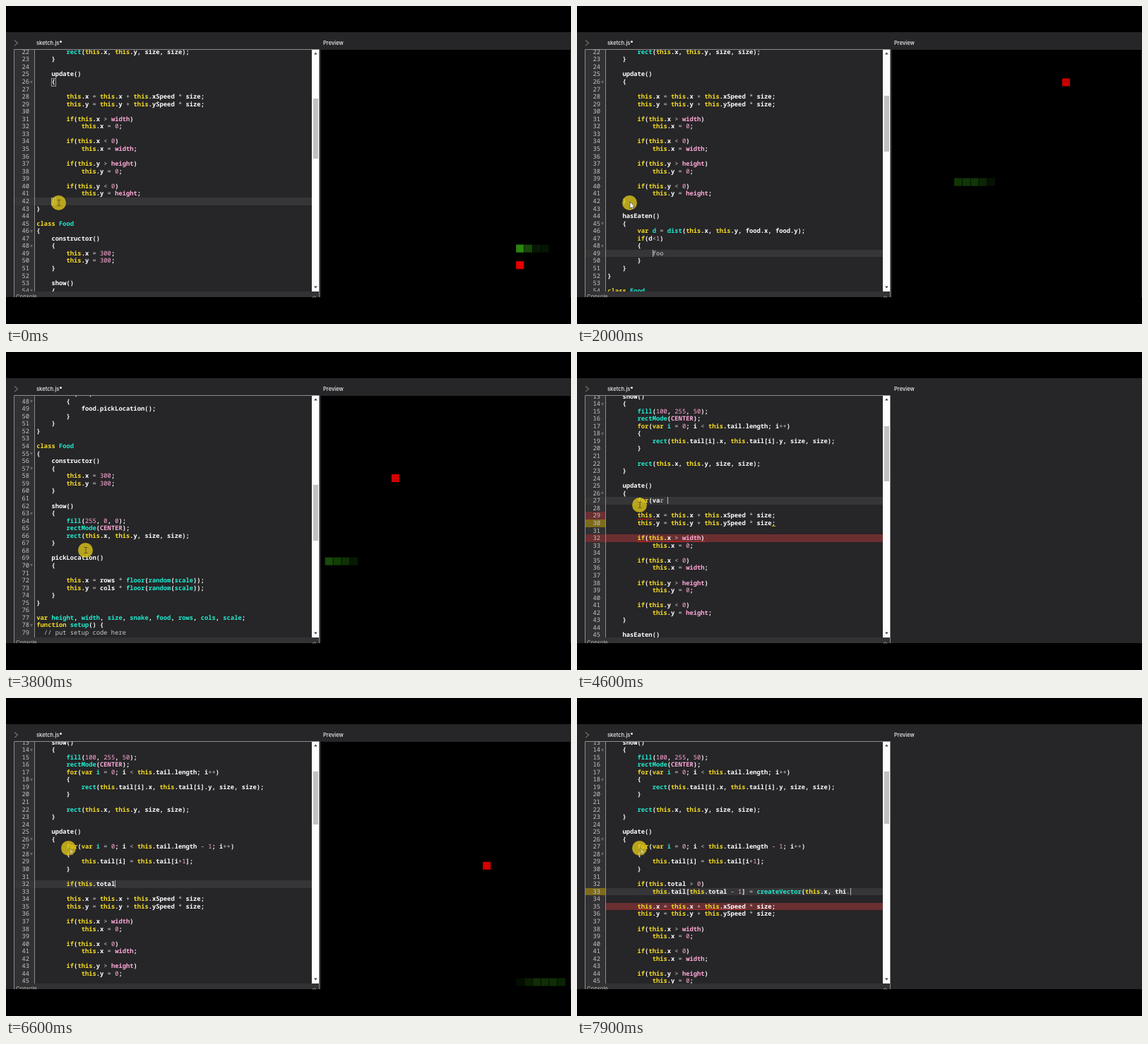
Write an HTML page with a canvas that moves like this. It is 800 by 450 pixels and loops after 8 s.

```html
<!DOCTYPE html>
<html lang="en">
<head>
<meta charset="utf-8">
<title>Snake sketch in a code editor</title>
<style>
  html, body { margin: 0; width: 100%; height: 100%; overflow: hidden; background: #000; }
  #stage { position: relative; width: 800px; height: 450px; overflow: hidden; background: #000; }
  #stage div, #stage span.abs, svg, canvas { position: absolute; }
  #app { left: 0; top: 37px; width: 800px; height: 375px; background: #262527; overflow: hidden; }
  .label { font: 500 7.6px/10px Inter, sans-serif; color: #f0f0f0; white-space: pre; }
  #gutter { left: 12px; top: 62px; width: 28px; height: 342px; background: #313032; }
  #editor { left: 12px; top: 62px; width: 422px; height: 342px; overflow: hidden; }
  #code { left: 0; top: 0; width: 422px; height: 342px; }
  .line { left: 0; width: 422px; height: 10.56px; white-space: pre; color: #fff;
    font: 600 8.8px/10.56px "Noto Sans Mono", monospace; text-rendering: geometricPrecision;
    font-variant-ligatures: none; }
  .num { left: 0; width: 21px; text-align: right; color: #c4c4c4; font-weight: 500; }
  .gut { left: 0; width: 28px; height: 10.56px; }
  .fold { left: 21.5px; top: 3.5px; border: solid transparent; border-width: 4px 2.5px 0; border-top-color: #666; }
  .src { left: 31.3px; }
  .line i { font-style: normal; opacity: .5; }
  .kw { color: #f5dc23; }
  .fn, .def { color: #1fecd0; font-weight: 700; }
  .var { color: #ffa9d9; font-weight: 700; }
  .n { color: #ffa9d9; font-weight: 500; }
  .op { color: #d0d0d0; font-weight: 500; }
  .com { color: #c8c8c8; font-weight: 500; }
  .on { background: #363537; }
  .err { background: #6b2f31; }
  .warn { background: #7d6b1c; }
  .wave { height: 1px; top: 9.4px; }
  .caret { width: 1px; height: 10px; background: #bbb; }
  .match { left: 52px; width: 5px; height: 9.5px; border: 1px solid #999; box-sizing: content-box; }
  #bar { left: 433px; top: 62px; width: 10px; height: 342px; background: #fcfcfc; }
  #thumb { left: 2px; width: 7px; background: #c1c1c1; }
  #spot { width: 21px; height: 21px; border-radius: 50%; background: #dcc41a; opacity: .8; }
  #beam { opacity: .6; }
</style>
</head>
<body>
<div id="stage">
  <div id="app"></div>
  <div class="label" style="left:43px;top:48px">sketch.js</div>
  <div style="left:76px;top:49px;width:3.4px;height:3.4px;border-radius:50%;background:#eee"></div>
  <div class="label" style="left:449px;top:48px">Preview</div>
  <div id="gutter"></div>
  <div id="editor"><div id="code"></div></div>
  <canvas id="view" width="353" height="350" style="left:446px;top:62px"></canvas>
  <div id="bar"><div id="thumb"></div></div>
  <div style="left:12px;top:404px;width:432px;height:8px;background:#323133;overflow:hidden">
    <div class="label" style="left:2px;top:3px;color:#aaa">Console</div>
  </div>
  <svg width="800" height="450" fill="none">
    <path d="M12 48.5l4.5 3.8-4.5 3.8" stroke="#777" stroke-width="1.1"/>
    <path d="M11.5 412V61.5H443.5V412M40.5 62V404" stroke="#8c8c8c"/>
    <path d="M436 68.5l2.4-3 2.4 3zM436 396.5l2.4 3 2.4-3z" fill="#444"/>
    <path d="M434 412.5l2.5-2 2.5 2" stroke="#999"/>
  </svg>
  <div id="spot"></div>
  <svg width="14" height="16" id="arrow"><path d="M1 0V9.5L3.2 7.6 4.7 11 6.2 10.3 4.8 7H7.6z" fill="#fff" stroke="#222" stroke-width=".6"/></svg>
  <svg width="8" height="12" id="beam"><path d="M1.5 1.5H3.5L4 2 4.5 1.5H6.5M4 2V9M1.5 9.5H3.5L4 9 4.5 9.5H6.5" fill="none" stroke="#222"/></svg>
</div>
<script>
const LOOP = 8000, STEP = 100, ROW = 10.56, COL = 5.28, CELL = 11.76;
const $ = id => document.getElementById(id);

const wrapTest = (axis, test, to) => ['', `        if(this.${axis} ${test})`, `            this.${axis} = ${to};`];
const keyTest = ([key, axis, v, other]) => [
  `  if(keyCode == ${key}_ARROW && snake.${axis}Speed != ${-v})`, '  {',
  `    snake.${axis}Speed = ${v};`, `    snake.${other}Speed = 0;`, '  }', ''];

const base = [
  ...`class Snake
{
    constructor()
    {
        this.x = 0;
        this.y = 0;
        this.xSpeed = 1;
        this.ySpeed = 0;
        this.total = 0;
        this.tail = [];
    }

    show()
    {
        fill(100, 255, 50);
        rectMode(CENTER);
        for(var i = 0; i < this.tail.length; i++)
        {
            rect(this.tail[i].x, this.tail[i].y, size, size);
        }

        rect(this.x, this.y, size, size);
    }

    update()
    {

        this.x = this.x + this.xSpeed * size;
        this.y = this.y + this.ySpeed * size;`.split('\n'),
  ...wrapTest('x', '> width', '0'), ...wrapTest('x', '< 0', 'width'),
  ...wrapTest('y', '> height', '0'), ...wrapTest('y', '< 0', 'height'),
  ...`    }
}

class Food
{
    constructor()
    {
        this.x = 300;
        this.y = 300;
    }

    show()
    {
        fill(255, 0, 0);
        rectMode(CENTER);
        rect(this.x, this.y, size, size);
    }

    pickLocation()
    {

        this.x = rows * floor(random(scale));
        this.y = cols * floor(random(scale));
    }
}

var height, width, size, snake, food, rows, cols, scale;
function setup() {
  // put setup code here
  height = 600;
  width = 600;
  scale = 30;
  rows = width/scale;
  cols = height/scale;
  size = rows;
  createCanvas(height, width);
  snake = new Snake();
  food = new Food();
  food.pickLocation();
}

function draw() {
  // put drawing code here
  frameRate(8);
  background(0);
  snake.update();
  food.show();
  snake.show();
}

function keyPressed()
{`.split('\n'),
  ...[['UP', 'y', -1, 'x'], ['DOWN', 'y', 1, 'x'], ['LEFT', 'x', -1, 'y'], ['RIGHT', 'x', 1, 'y']].flatMap(keyTest),
  '}'
];

// Typed text: start time, line it follows, new lines, count of faint last characters
const edits = [
  { t: 100, after: 42, text: ['', '    hasEaten()', '    {', '    }'], soft: 2 },
  { t: 480, after: 45, text: ['        var d = dist(this.x, this.y, food.x, food.y);', '        if(d<1)', '        {', '        }'], soft: 4 },
  { t: 1920, after: 48, text: ['            food.pickLocation();'], soft: 3 },
  { t: 2750, after: 98, text: ['  snake.hasEaten();'], soft: 0 },
  { t: 4400, after: 26, text: ['        for(var i = 0; i < this.tail.length - 1; i++)', '        {', '        }'], soft: 2 },
  { t: 5550, after: 28, text: ['            this.tail[i] = this.tail[i+1];'], soft: 2 },
  { t: 6250, after: 30, text: ['', '        if(this.total > 0)'], soft: 0 },
  { t: 6720, after: 32, text: ['            this.tail[this.total - 1] = createVector(this.x, thi.'], soft: 1, rate: .046 }
];

// Lint marks: from, to, line, gutter kind, line kind, underline column and length
const marks = [
  [800, 1600, 47, 'err', 'err'],
  [2800, 3200, 92, 'err'], [2800, 3200, 100, 'err'],
  [4500, 5500, 29, 'err', '', 8, 5], [4500, 5500, 30, 'warn', '', 44, 1], [4500, 5500, 32, 'err', 'err', 8, 18],
  [7000, 8000, 35, '', 'err', 8, 29], [7000, 8000, 33, 'warn']
];

// Preview runs: from, to, row, column at time ref, ref, trail strength, food column and row, food red
const runs = [
  [0, 800, 24, 24, 0, [.54, .29, .1, .08], 24, 26, 230],
  [1900, 2700, 16, 8, 2000, [.22, .22, .22, .15, .07], 21, 4, 200],
  [3200, 4400, 20, 4, 3200, [.3, .25, .2, .1], 9, 10, 210],
  [5600, 6800, 29, 24, 6600, [.05, .12, .19, .19, .19, .14], 20, 15, 210]
];

// Keyframes: time, then values
const scroll = [[0, -162], [2400, -162], [2700, -703.5], [3500, -703.5], [4200, -69.2]];
const mouse = [[0, 74, 278], [2400, 74, 278], [2700, 131, 328], [3500, 131, 328], [4200, 88, 216], [4700, 88, 216], [5000, 88.5, 212.5]];

function track(keys, t) {
  const i = keys.findLastIndex(k => k[0] <= t), a = keys[i], b = keys[i + 1] || a;
  const p = b === a ? 0 : (t - a[0]) / (b[0] - a[0]);
  return a.slice(1).map((v, j) => v + (b[j + 1] - v) * p);
}

const words = s => new Set(s.split(' '));
const keywords = words('this if for var class function new');
const calls = words('rect fill rectMode dist createVector createCanvas frameRate background scale floor random');
const globals = words('width height CENTER');
const escape = s => s.replace(/&/g, '&amp;').replace(/</g, '&lt;');

function paint(text) {
  const allDefs = text.startsWith('var ');
  let last = '', dot = false;
  return text.replace(/\/\/.*|\w+|[=+*\/<>!&-]+|[^\w\s]/g, s => {
    let kind = '';
    if (s.startsWith('//')) kind = 'com';
    else if (/^\d/.test(s)) kind = 'n';
    else if (/^\w/.test(s)) {
      if (keywords.has(s)) kind = 'kw';
      else if (allDefs || /^(var|class|function)$/.test(last)) kind = 'def';
      else if (!dot && calls.has(s)) kind = 'fn';
      else if (!dot && globals.has(s)) kind = 'var';
      last = s;
    } else if (/[=+*\/<>!&-]/.test(s)) kind = 'op';
    dot = s === '.';
    return kind ? `<span class="${kind}">${escape(s)}</span>` : escape(s);
  });
}

function documentAt(t) {
  const lines = base.slice();
  const caret = { line: 42, col: 5, soft: 0 };
  for (const e of edits) {
    if (t < e.t) break;
    let left = Math.floor((t - e.t) * (e.rate || .041));
    const shown = [];
    for (const line of e.text) {
      if (shown.length && --left < 0) break;
      const indent = line.search(/\S|$/), body = line.slice(indent);
      shown.push(line.slice(0, indent) + body.slice(0, left));
      caret.soft = left <= body.length ? Math.min(e.soft, left) : e.soft === 1 ? 1 : 0;
      left = Math.max(0, left - body.length);
      if (left === 0 && shown.at(-1).length < line.length) break;
    }
    lines.splice(e.after, 0, ...shown);
    caret.line = e.after + shown.length;
    caret.col = shown.at(-1).length - (caret.soft > 2 ? caret.soft : 0);
  }
  return { lines, caret };
}

function drawCode(t) {
  const { lines, caret } = documentAt(t);
  const [top] = track(scroll, t);
  let html = '';
  lines.forEach((text, i) => {
    const n = i + 1, y = top + i * ROW - 62;
    if (y < -ROW || y > 342) return;
    const mark = marks.find(m => t >= m[0] && t < m[1] && m[2] === n) || [];
    const [, , , side, fill, waveCol, waveLen] = mark;
    const here = n === caret.line;
    const cut = text.length - (here ? caret.soft : 0);
    html += `<div class="line ${fill || (here ? 'on' : '')}" style="top:${y}px">`;
    if (side) html += `<div class="gut ${side}"></div>`;
    else if (fill) html += '<div class="gut" style="background:#313032"></div>';
    html += `<span class="abs num">${n}</span>`;
    if (text.endsWith('{')) html += '<div class="fold"></div>';
    if (t < 100 && (n === 26 || n === 42)) html += '<div class="match"></div>';
    html += `<span class="abs src">${paint(text.slice(0, cut))}`;
    if (cut < text.length) html += `<i>${paint(text.slice(cut))}</i>`;
    html += '</span>';
    if (waveLen) {
      const ink = side === 'warn' ? '#e8c020' : '#f02020';
      html += `<div class="wave" style="left:${31.3 + waveCol * COL}px;width:${waveLen * COL}px;` +
        `background:repeating-linear-gradient(90deg,${ink} 0 2px,transparent 2px 3px)"></div>`;
    }
    if (here) html += `<div class="caret" style="left:${31.3 + caret.col * COL}px"></div>`;
    html += '</div>';
  });
  $('code').innerHTML = html;

  const total = (lines.length + 3) * ROW;
  $('thumb').style.top = 13 + 318 * (62 - top) / total + 'px';
  $('thumb').style.height = 318 * 342 / total + 'px';
}

const ctx = $('view').getContext('2d');
function cell(col, row, color) {
  ctx.fillStyle = color;
  ctx.fillRect(col * CELL - 6, row * CELL - 6.6, CELL - .7, CELL - .7);
}

function drawView(t) {
  const run = runs.find(r => t >= r[0] && t < r[1]);
  ctx.fillStyle = run ? '#000' : '#262527';
  ctx.fillRect(0, 0, 353, 350);
  if (!run) return;
  const [, , row, col, ref, trail, foodCol, foodRow, red] = run;
  cell(foodCol, foodRow, `rgb(${red},0,0)`);
  const start = col + Math.floor((t - ref) * .048);
  trail.forEach((a, i) => cell(((start + i) % 31 + 31) % 31, row, `rgba(80,245,30,${a})`));
}

function drawMouse(t) {
  const [x, y] = track(mouse, t);
  const place = (id, dx, dy) => { $(id).style.left = x + dx + 'px'; $(id).style.top = y + dy + 'px'; };
  const early = t >= 100 && t < 2500, late = t >= 4800;
  place('spot', -10.5, -10.5);
  place('arrow', 0, -1);
  place('beam', -3.5, -5);
  $('arrow').style.opacity = early ? 1 : late ? .35 : 0;
  $('beam').style.display = early || late ? 'none' : '';
}

const origin = performance.now();
let shown = -1;
function frame() {
  const t = Math.floor((performance.now() - origin) % LOOP / STEP) * STEP;
  if (t !== shown) {
    shown = t;
    drawCode(t);
    drawView(t);
    drawMouse(t);
  }
  requestAnimationFrame(frame);
}
frame();
</script>
</body>
</html>
```
